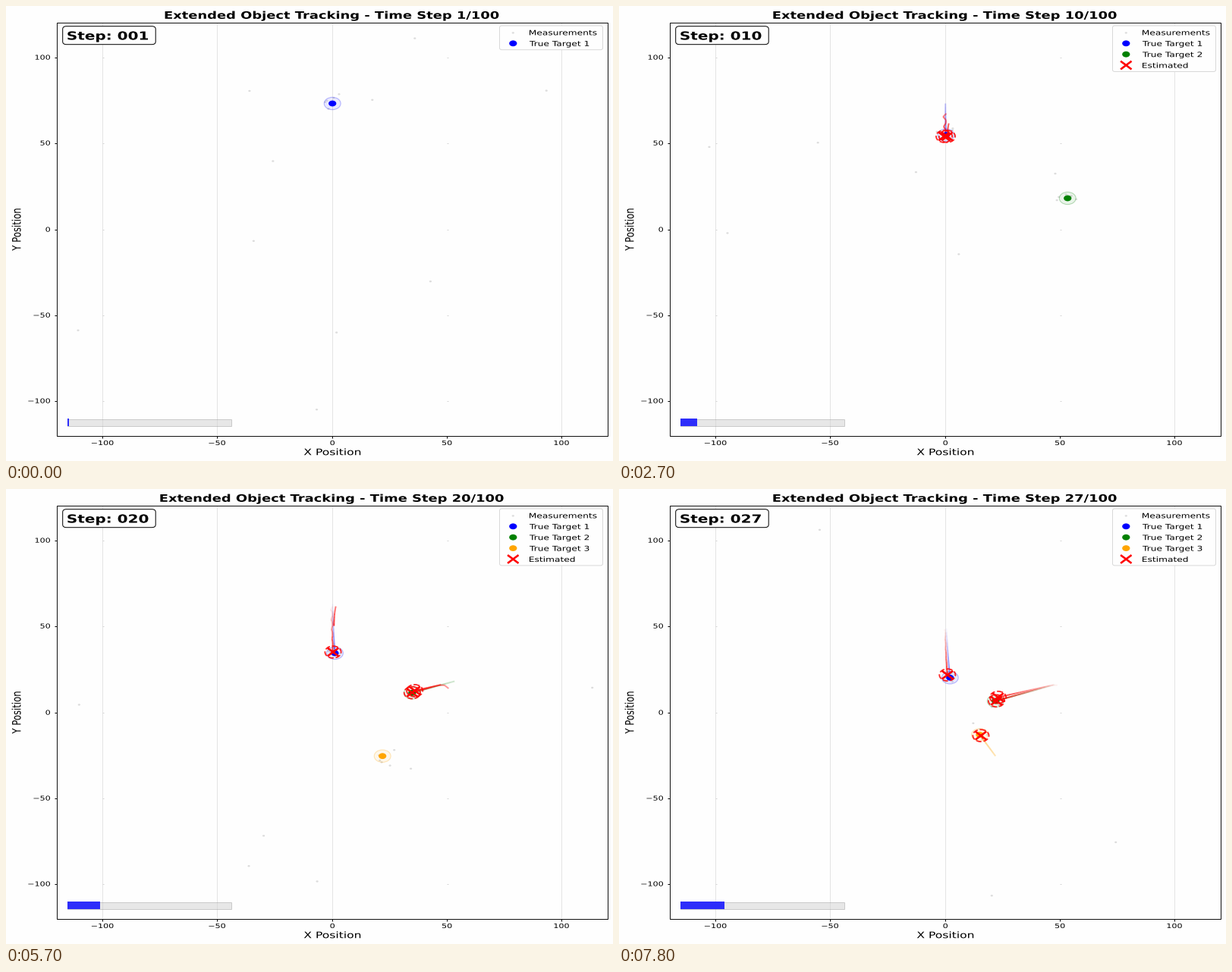
These frames come from a looping animation (800x600 px, 8000 ms). A matplotlib script:

```python
import numpy as np
import matplotlib.pyplot as plt
from matplotlib.animation import FuncAnimation
from matplotlib.collections import EllipseCollection, LineCollection
from matplotlib.colors import to_rgba
from matplotlib.patches import Ellipse, FancyBboxPatch, PathPatch, Rectangle
from matplotlib.textpath import TextPath
from matplotlib.transforms import Affine2D

PX = 0.72                      # one pixel in points at 100 dpi
STRETCH = (10 / 9, 5 / 6)      # the square plot is shown on a 4:3 stage
SCALE = np.array([3.027, 2.268])
TRAIL = 15
BACK = "#fefefe"

fig = plt.figure(figsize=(8, 6), dpi=100, facecolor=BACK)
page = fig.add_axes([0, 0, 1, 1])
page.set(xlim=(0, 800), ylim=(600, 0))
page.axis("off")


def to_px(x, y):
    return 430.2 + SCALE[0] * np.asarray(x), 294.1 - SCALE[1] * np.asarray(y)


# ---- drawing helpers, all in page pixels ----
drawn = []


def keep(artist):
    drawn.append(artist)
    return artist


def text(x, y, s, size, ha="center", bold=False, vertical=False, z=8):
    prop = {"family": "DejaVu Sans", "weight": "bold" if bold else "normal"}
    path = TextPath((0, 0), s, size=size, prop=prop)
    turn = Affine2D().scale(1, -1).rotate_deg(-90 if vertical else 0).scale(*STRETCH)
    path = turn.transform_path(path)
    box = path.get_extents()
    if vertical:
        shift = (x, y - (box.y0 + box.y1) / 2)
    else:
        anchor = {"left": box.x0, "right": box.x1, "center": (box.x0 + box.x1) / 2}
        shift = (x - anchor[ha], y)
    path = Affine2D().translate(*shift).transform_path(path)
    return page.add_patch(PathPatch(path, fc="black", lw=0, zorder=z))


def line(xs, ys, color, width, z):
    return page.plot(xs, ys, color=color, lw=width * PX, zorder=z,
                     solid_capstyle="butt")[0]


def rounded(x0, y0, x1, y1, radius, edge, z):
    style = f"round,pad=0,rounding_size={radius}"
    return page.add_patch(FancyBboxPatch(
        (x0, y0), x1 - x0, y1 - y0, boxstyle=style, mutation_aspect=0.75,
        fc=BACK, ec=edge, lw=PX, zorder=z))


def dot(x, y, color, z):
    return page.add_patch(Ellipse((x, y), 10.2, 7.8, fc=color, lw=0, zorder=z))


def cross(x, y, z):
    for sign in (1, -1):
        keep(line([x - 7.2, x + 7.2], [y - 5.4 * sign, y + 5.4 * sign], "red", 2.6, z))


def specks(xs, ys, z=2):
    n = len(xs)
    keep(page.add_collection(EllipseCollection(
        [3.2] * n, [2.4] * n, [0] * n, units="xy", offsets=np.column_stack([xs, ys]),
        transOffset=page.transData, facecolors="#dcdcdc", linewidths=0, zorder=z)))


def trail(points, color, peak, z):
    """Polyline that fades with age."""
    if len(points) < 2:
        return
    pts = np.column_stack(to_px(*np.array(points).T))
    count = len(pts) - 1
    alphas = peak * (np.arange(count) + TRAIL - count) / TRAIL
    keep(page.add_collection(LineCollection(
        np.stack([pts[:-1], pts[1:]], axis=1),
        colors=[to_rgba(color, a) for a in alphas], linewidths=2 * PX, zorder=z)))


# ---- motion, in plot units per time step ----
def truth1(n):
    return 2 * ((n - 1) / 26) ** 2, 73 - 2.04 * (n - 1)


def truth2(n):
    return 53.2 - 1.847 * (n - 10), 17.9 - 0.676 * (n - 10)


def truth3(n):
    return 21.8 - 0.98 * (n - 20), -25.6 + 1.77 * (n - 20)


def main1(n):
    x, y = truth1(n)
    wobble = np.cos(2 * np.pi * (n - 4) / 3) * np.exp((3 - n) / 7)
    return x - 0.042 * n - wobble, y + 0.14 * (n - 15.5)


def double1(n):
    x, y = truth1(n)
    return x + 1.4 * np.exp((6 - n) / 4), y + 0.14 * (n - 15.5)


def upper2(n):
    x, y = truth2(n)
    return x + 1.1, y + 1.3 + 0.12 * (n - 20) - 3.2 * np.exp(1.5 * (12 - n))


def lower2(n):
    x, y = truth2(n)
    return x + 0.06 * (n - 20), y + 0.1


def main3(n):
    x, y = truth3(n)
    return x + 0.5, y - 0.5


# name, colour, path, first step
TARGETS = [
    ("True Target 1", "blue", truth1, 1),
    ("True Target 2", "green", truth2, 10),
    ("True Target 3", "orange", truth3, 20),
]

# path, first step, last step
ESTIMATES = [
    (main1, 3, 27),
    (double1, 6, 12),
    (upper2, 12, 27),
    (lower2, 13, 27),
    (main3, 26, 27),
]


def draw_measurements(n):
    rng = np.random.default_rng(100 + n)
    specks(*to_px(*rng.uniform(-118, 118, (2, rng.poisson(6)))))
    for _, _, path, start in TARGETS:
        if n >= start:
            x, y = path(n)
            specks(*to_px(x + rng.normal(0, 2.2, 6), y + rng.normal(0, 2.2, 6)))


def draw_target(n, color, path, start):
    trail([path(k) for k in range(max(start, n - TRAIL + 1), n + 1)], color, 0.55, 3)
    x, y = to_px(*path(n))
    keep(page.add_patch(Ellipse(
        (x, y), *(7.2 * SCALE), lw=1.1 * PX,
        fc=to_rgba(color, 0.08), ec=to_rgba(color, 0.27), zorder=3)))
    keep(dot(x, y, color, 5))


def draw_estimate(n, path, first, last):
    if not first <= n < last + TRAIL:
        return
    steps = range(max(first, n - TRAIL + 1), min(n, last) + 1)
    trail([path(k) for k in steps], "red", 0.85, 4)
    if n <= last:
        x, y = to_px(*path(n))
        keep(page.add_patch(Ellipse(
            (x, y), *(7 * SCALE), fill=False, ec=to_rgba("red", 0.85), lw=1.8 * PX,
            ls=(0, (3.7, 1.6)), zorder=6)))
        cross(x, y, 7)


def draw_legend(n):
    rows = [("Measurements", None)]
    rows += [(name, color) for name, color, _, start in TARGETS if n >= start]
    if n >= ESTIMATES[0][1]:
        rows.append(("Estimated", "red"))
    keep(rounded(650.5, 26, 786.5, 28.9 + 14.4 * len(rows), 3, "#d9d9d9", 8))
    for i, (name, color) in enumerate(rows):
        y = 34.9 + 14.4 * i
        keep(text(690, y + 3.5, name, 11, "left", z=9))
        if color is None:
            specks([668.3], [y + 0.5], 9)
        elif color == "red":
            cross(668.3, y, 9)
        else:
            keep(dot(668.3, y, color, 9))


def draw_static():
    for v in range(-100, 101, 50):
        x, y = np.floor(to_px(v, v))
        if v != 50:
            line([x, x], [22, 566], "#e4e4e4", 1, 1)
        line([x, x], [567, 570], "black", 1, 8)
        line([63.5, 67], [y + 1, y + 1], "black", 1, 8)
        for grid_x in (-100, 50):
            px = np.floor(to_px(grid_x, 0)[0])
            line([px - 0.5, px + 1.5], [y + 1, y + 1], "#d6d6d6", 1, 1)
        label = str(v).replace("-", "\u2212")
        text(x + 0.2, 579, label, 10)
        text(58, y + 3.6, label, 10, "right")
    page.add_patch(Rectangle((67, 22), 726, 545, fill=False, lw=PX, ec="#111111", zorder=8))
    text(430, 592.2, "X Position", 14)
    text(19.4, 295, "Y Position", 14, vertical=True)
    rounded(74.7, 26.7, 197.2, 50.7, 5, "black", 8)
    page.add_patch(Rectangle((81, 545), 216, 9, fc=(.82, .82, .82, .5),
                             ec=(.5, .5, .5, .35), lw=PX, zorder=4))


def update(i):
    while drawn:
        drawn.pop().remove()
    n = i // 3 + 1
    keep(text(429.5, 16.8, f"Extended Object Tracking - Time Step {n}/100", 16.1, bold=True))
    keep(text(81.3, 44.5, f"Step: {n:03d}", 18, "left", bold=True, z=9))
    keep(page.add_patch(Rectangle((81, 544), 2.16 * n, 10, fc="#2d2dfa", lw=0, zorder=5)))
    draw_measurements(n)
    for _, color, path, start in TARGETS:
        if n >= start:
            draw_target(n, color, path, start)
    for estimate in ESTIMATES:
        draw_estimate(n, *estimate)
    draw_legend(n)
    return drawn


draw_static()
anim = FuncAnimation(fig, update, frames=80, interval=100, repeat=True,
                     repeat_delay=0, init_func=lambda: [], blit=False)
plt.show()
```
